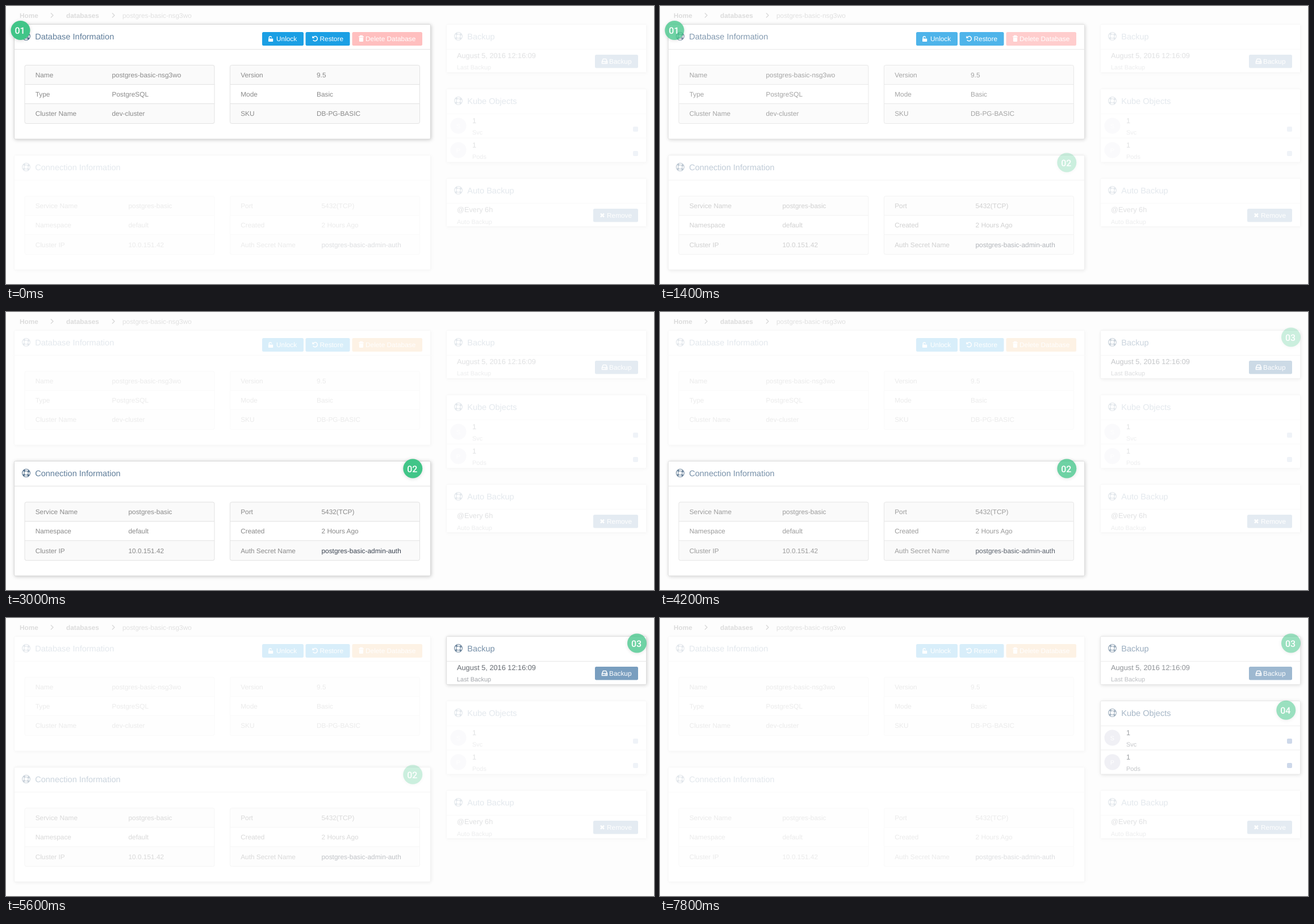
An HTML page for the animation above (8 s loop, 1141 by 491 pixels).

```html
<!DOCTYPE html>
<html lang="en">
<head>
<meta charset="utf-8">
<title>Database overview</title>
<style>
html, body { margin: 0; width: 100%; height: 100%; overflow: hidden; background: #fdfdfd; }
svg { display: block; width: 100%; height: 100%; font: 11.85px "Liberation Sans", Arial, sans-serif; text-rendering: geometricPrecision; }
.card { fill: #fff; stroke: #d9d9d9; filter: drop-shadow(1px 1px 3px rgba(0,0,0,.2)); }
.line { stroke: #e2e2e2; fill: none; }
.title { font-size: 14.56px; fill: #5f7d9a; }
.cell { fill: #8a8a8a; }
.dark { fill: #3a4350; }
.big { font-size: 12.75px; fill: #4a5058; }
.small { font-size: 10.93px; fill: #93979d; }
.white { fill: #fff; }
.icon { fill: none; stroke: #fff; stroke-width: 1.5; }
.ring { fill: none; stroke: #526f8b; }
.crumb { fill: #e0e0e0; }
.bold { font-weight: bold; fill: #dcdcdc; }
.badge circle { fill: #41c588; filter: drop-shadow(0 1px 3px rgba(0,0,0,.15)); }
.badge text { font: 500 16px Roboto, sans-serif; fill: #fff; text-anchor: middle; }
</style>
</head>
<body>
<svg id="stage" viewBox="0 0 1141 491"></svg>
<script>
const text = (x, y, s, cls) => `<text x="${x}" y="${y}" class="${cls}">${s}</text>`;
const rect = (x, y, w, h, attrs) => `<rect x="${x}" y="${y}" width="${w}" height="${h}" ${attrs}/>`;
const path = (d, cls) => `<path d="${d}" class="${cls}"/>`;

const lifeRing = (x, y) => `<g class="ring" transform="translate(${x} ${y})">
  <circle r="6.9" stroke-width="1.1"/><circle r="3.6" stroke-width="1.1"/>
  <circle r="5.3" stroke-width="3" stroke-dasharray="3 5.325" stroke-dashoffset="-2.66"/></g>`;

const icons = {
  lock: path('M463.3 58v-2.2a2.1 2.1 0 0 1 4.2 0', 'icon') + rect(462, 57.4, 8.2, 5.6, 'rx=".8" fill="#fff"'),
  undo: path('M541 55.2a4.1 4.1 0 1 1-.3 4.6', 'icon') + path('M539.3 52.8v4.2h4.2z', 'white'),
  trash: path('M621 54.2h9M623.8 54v-1.4h3.4v1.4', 'icon') +
    path('M621.9 55.6h7.2v6.2q0 1.2-1.2 1.2h-4.8q-1.2 0-1.2-1.2z', 'white'),
  disk: `<g stroke-width="1.1">${path('M1049.5 98l2-4.5h5l2 4.5v3.5h-9zh9', 'icon')}</g>` +
    path('M1054.5 99.3h3v1.2h-3z', 'white'),
  cross: `<path d="M1047 366.6l6 6m0-6l-6 6" stroke="#fff" stroke-width="2.5"/>`
};

const button = (x, y, w, h, fill, icon, tx, label, id = '') =>
  rect(x, y, w, h, `rx="2.5" fill="${fill}" id="${id}"`) + icons[icon] + text(tx, y + h / 2 + 4.1, label, 'white');

// A two-column table of three rows
function table(x, y, w, valueX, rows) {
  let s = rect(x, y, w, 103, 'rx="3" fill="#fff"');
  rows.forEach(([key, value, cls = 'cell'], i) => {
    const top = y + i * 34.3;
    if (i != 1) s += rect(x, top, w, 34.3, 'rx="2" fill="#fafafa"');
    s += text(x + 18.7, top + 21.2, key, 'cell') + text(valueX, top + 21.2, value, cls);
  });
  return s + rect(x, y, w, 103, 'rx="3" class="line"') +
    path(`M${x} ${y + 34}h${w}M${x} ${y + 68}h${w}`, 'line');
}

const panel = (x, y, w, h, title, body) => rect(x, y, w, h, 'fill="#fff"') +
  `<g class="panel">${rect(x, y, w, h, 'rx="2" class="card"')}${path(`M${x} ${y + 44}h${w}`, 'line')}
  ${lifeRing(x + 21, y + 20.9)}${text(x + 36.7, y + 26, title, 'title')}${body}</g>`;

const kubeRow = (y, label) => `<circle cx="796.5" cy="${y}" r="14" fill="#e4e4ee"/>` +
  `<text x="796.5" y="${y + 4}" text-anchor="middle" class="small white">${label[0]}</text>` +
  text(821, y - 5, '1', 'big') + text(821, y + 15.8, label, 'small') +
  rect(1104, y + 1.5, 9, 9, 'rx="2" fill="#a5b8da"');

const badge = (x, y, n) => `<g class="badge"><circle cx="${x}" cy="${y}" r="17"/>${text(x - 1, y + 6, n, '')}</g>`;

const blue = '#1b9fe4', steel = '#628db4';
const stage = document.getElementById('stage');
stage.innerHTML =
  text(24, 20.7, 'Home', 'bold') + text(106, 20.7, 'databases', 'bold') +
  text(205, 20.7, 'postgres-basic-nsg3wo', 'crumb') +
  '<path d="M79 12.5l4 4-4 4M187 12.5l4 4-4 4" fill="none" stroke="#d8d8d8" stroke-width="1.3"/>' +
  panel(14.5, 32.5, 733, 202.5, 'Database Information',
    button(451, 46, 73, 24, blue, 'lock', 476, 'Unlock') +
    button(527.5, 46, 78, 24, blue, 'undo', 552.5, 'Restore') +
    button(609.5, 46, 123.5, 24, '', 'trash', 633, 'Delete Database', 'delete') +
    table(33, 104.5, 334, 186.5, [['Name', 'postgres-basic-nsg3wo'], ['Type', 'PostgreSQL'], ['Cluster Name', 'dev-cluster']]) +
    table(394.5, 104.5, 334, 547, [['Version', '9.5'], ['Mode', 'Basic'], ['SKU', 'DB-PG-BASIC']])) +
  panel(14.5, 263.5, 733, 202.5, 'Connection Information',
    table(33, 335.8, 334, 215.5, [['Service Name', 'postgres-basic'], ['Namespace', 'default'], ['Cluster IP', '10.0.151.42']]) +
    table(394.5, 335.8, 334, 555.5, [['Port', '5432(TCP)'], ['Created', '2 Hours Ago'],
      ['Auth Secret Name', 'postgres-basic-admin-auth', 'dark']])) +
  panel(775.5, 32.5, 352, 85, 'Backup',
    text(794, 92, 'August 5, 2016 12:16:09', 'big') + text(794, 112.4, 'Last Backup', 'small') +
    button(1037, 86, 76, 23.5, steel, 'disk', 1062, 'Backup')) +
  panel(775.5, 146.5, 352, 129.5, 'Kube Objects',
    kubeRow(211.5, 'Svc') + path('M775.5 233h352', 'line') + kubeRow(254.5, 'Pods')) +
  panel(775.5, 304.5, 352, 85, 'Auto Backup',
    text(794, 364, '@Every 6h', 'big') + text(794, 384.5, 'Auto Backup', 'small') +
    button(1034, 358, 79, 23.5, steel, 'cross', 1058, 'Remove')) +
  badge(25.5, 43, '01') + badge(716.3, 276.5, '02') + badge(1111, 44.5, '03') + badge(1102.3, 162.8, '04');

const panels = stage.querySelectorAll('.panel');
const badges = stage.querySelectorAll('.badge');
const deleteBox = document.getElementById('delete');

// Eleven hard steps of 200 ms
const progress = (t, start) => Math.max(0, Math.min(11, Math.floor((t - start) / 200) + 1)) / 11;

// Badges take only a few tints
const tints = [0, .09, .27, .53, .76, .91, 1];
const nearest = v => tints.reduce((a, b) => Math.abs(b - v) < Math.abs(a - v) ? b : a);

function draw(now) {
  const t = now % 8000;
  const [a, b, c] = [1000, 4000, 7000].map(start => progress(t, start));
  [1 - a, a - b, b - c, c, 0].forEach((v, i) => {
    panels[i].style.opacity = .165 + .835 * v;
    if (badges[i]) badges[i].style.opacity = nearest(v);
  });
  deleteBox.style.fill = a > .8 ? '#f9b266' : '#ffbfbf';
  requestAnimationFrame(draw);
}
requestAnimationFrame(draw);
</script>
</body>
</html>
```
